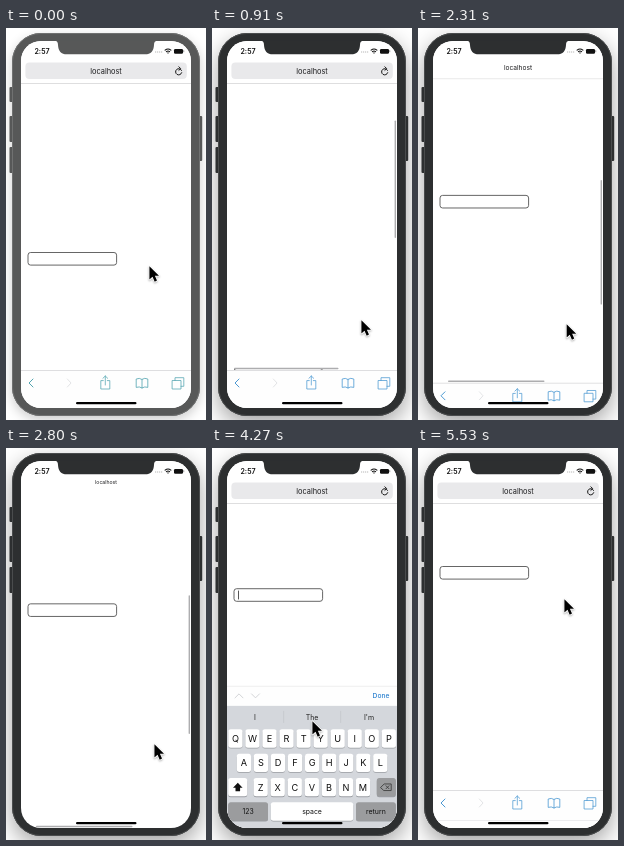
Recreate the animation shown at these times as an HTML page with a canvas. Size 200x392 px, loop 5.6 s.

```html
<!DOCTYPE html>
<html lang="en">
<head>
<meta charset="utf-8">
<title>Phone browser with keyboard</title>
<style>
html, body { margin: 0; width: 100%; height: 100%; overflow: hidden; background: #fff; }
canvas { display: block; width: 200px; height: 392px; }
</style>
</head>
<body>
<canvas id="stage"></canvas>
<script>
const W = 200, H = 392, LOOP = 5600, STEP = 70;
const FONT = 'Inter, Roboto, "Liberation Sans", sans-serif';
const canvas = document.getElementById('stage');
const ctx = canvas.getContext('2d');
const ratio = Math.max(1, window.devicePixelRatio || 1);
canvas.width = W * ratio;
canvas.height = H * ratio;

// Motion tracks: [time, value], eased between neighbours
const fieldTrack = [[280, 224], [880, 340], [910, 340], [1620, 108], [1800, 108], [2600, 192],
  [2870, 148], [3010, 148], [3350, 182], [3920, 182], [4500, 118]];
const collapseTrack = [[950, 0], [1450, 1], [2150, 1], [2412, 0], [2480, 0], [2800, 1], [3900, 1], [4200, 0]];
const keyboardTrack = [[3950, 380], [4383, 209], [5050, 209], [5600, 380]];
const barTrack = [[280, 0], [350, 1], [3010, 1], [3350, 0]];
const tintTrack = [[0, 0], [140, 1]];
const cursorX = [[280, 143], [840, 149], [3010, 148], [3430, 99], [3700, 99], [3850, 97],
  [3960, 97], [4250, 100], [4400, 100], [4900, 157], [5130, 157], [5430, 146]];
const cursorY = [[280, 237], [840, 291], [910, 291], [2240, 295], [3010, 295], [3430, 198], [3700, 198],
  [3850, 187], [3960, 187], [4250, 272], [4400, 272], [4900, 215], [5130, 215], [5430, 150]];

function at(track, t) {
  if (t <= track[0][0]) return track[0][1];
  for (let i = 1; i < track.length; i++) {
    const [t0, a] = track[i - 1], [t1, b] = track[i];
    if (t < t1) {
      const k = (t - t0) / (t1 - t0);
      return a + (b - a) * k * k * (3 - 2 * k);
    }
  }
  return track[track.length - 1][1];
}

function rect(x, y, w, h, color) {
  ctx.fillStyle = color;
  ctx.fillRect(x, y, w, h);
}

function round(x, y, w, h, r, color) {
  ctx.beginPath();
  ctx.roundRect(x, y, w, h, r);
  ctx.fillStyle = color;
  ctx.fill();
}

function text(s, x, y, size, color, weight = 400) {
  ctx.font = `${weight} ${size}px ${FONT}`;
  ctx.fillStyle = color;
  ctx.textAlign = 'center';
  ctx.textBaseline = 'alphabetic';
  ctx.fillText(s, x, y + size * 0.36);
}

function stroke(d, x, y, color, width = 0.8) {
  ctx.save();
  ctx.translate(x, y);
  ctx.strokeStyle = color;
  ctx.lineWidth = width;
  ctx.lineCap = ctx.lineJoin = 'round';
  ctx.stroke(new Path2D(d));
  ctx.restore();
}

function fillPath(d, x, y, color) {
  ctx.save();
  ctx.translate(x, y);
  ctx.fillStyle = color;
  ctx.fill(new Path2D(d));
  ctx.restore();
}

function drawBody(active) {
  const shell = active ? '#2d2f30' : '#575858';
  ctx.save();
  ctx.shadowColor = active ? 'rgba(0,0,0,.36)' : 'rgba(0,0,0,.2)';
  ctx.shadowBlur = (active ? 22 : 12) * ratio;
  ctx.shadowOffsetY = (active ? 8 : 4) * ratio;
  round(6, 5, 188, 383, 29, shell);
  ctx.restore();
  for (const [y, h] of [[59, 15], [88, 26], [119, 26]]) round(3.5, y, 3.5, h, 1, shell);
  round(193, 88, 3.2, 45, 1, shell);
  ctx.beginPath();
  ctx.roundRect(6.5, 5.5, 187, 382, 28.5);
  ctx.strokeStyle = active ? '#4a4c4d' : '#707171';
  ctx.lineWidth = 1;
  ctx.stroke();
}

function drawNotch(active) {
  fillPath('M48 12.5C51 13 52 14 52 17C52.3 23 55 26.3 61 26.3H139C145 26.3 147.7 23 148 17C148 14 149 13 152 12.5Z',
    0, 0, active ? '#2d2f30' : '#575858');
}

function drawStatus() {
  text('2:57', 36, 23.2, 7.1, '#111', 600);
  for (let i = 0; i < 4; i++) rect(149 + i * 2, 23.4, 1.2, 1.2, '#c4c4c4');
  stroke('M-2.9 -1.2Q0 -3.6 2.9 -1.2M-1.6 .3Q0 -1.1 1.6 .3', 162, 23.4, '#111', 1.1);
  round(161.3, 24.2, 1.4, 1.4, 0.7, '#111');
  round(168, 20.9, 9, 4.8, 1.3, '#111');
  rect(177.4, 22.4, 0.8, 1.8, '#777');
}

function drawAddress(p) {
  const line = 55.5 - 13.5 * p;
  rect(15, 13, 170, line - 13, '#fff');
  ctx.globalAlpha = Math.max(0, 1 - 3.2 * p);
  round(19.4, 34.5, 161.4, 16.6, 4, '#e9e9eb');
  stroke('M2.8 -1.2A3.1 3.1 0 1 0 3 1.1M.2 -4.8L2 -3L.2 -1.3', 172.7, 43.6, '#111', 1);
  ctx.globalAlpha = 1 - p;
  rect(15, line - 0.5, 170, 0.7, '#d0d0d2');
  ctx.globalAlpha = 1;
  text('localhost', 100, 43 - 9 * p, 7.4 - 2.3 * p, '#1c1c1e');
  return line;
}

function drawToolbar(top, tint) {
  const mix = (a, b) => Math.round(a + (b - a) * tint);
  const blue = `rgb(${mix(82, 75)},${mix(164, 152)},${mix(176, 210)})`;
  const y = top + 13;
  rect(15, top, 170, 382 - top, '#fefefe');
  rect(15, top, 170, 0.7, '#d2d2d4');
  stroke('M2 -4L-2 0L2 4', 25, y, blue, 1);
  stroke('M-1.6 -4L2 0L-1.6 4', 63, y, '#dcdee0', 0.8);
  stroke('M-2 -2.4H-4.5V6H4.5V-2.4H2M0 2V-7M-2.4 -4.7L0 -7L2.4 -4.7', 99.3, y, blue, 0.75);
  stroke('M0 -3.6Q-2.6 -5.5 -5.8 -4V4.4Q-2.6 3.2 0 5Q2.6 3.2 5.8 4.4V-4Q2.6 -5.5 0 -3.6V5', 136, y, blue);
  stroke('M-5.5 -2.5H3V6H-5.5ZM-3 -2.5V-5.3H5.8V3.3H3', 172, y, blue, 0.75);
}

function drawField(y, focused) {
  ctx.beginPath();
  ctx.roundRect(22, y + 0.5, 88.6, 12.6, 2.6);
  ctx.fillStyle = '#fff';
  ctx.fill();
  ctx.strokeStyle = '#555';
  ctx.lineWidth = 0.9;
  ctx.stroke();
  if (focused) rect(26, y + 2.4, 0.9, 8.8, '#444');
}

function drawScrollbars(field, p, top, bottom, alpha) {
  ctx.globalAlpha = alpha;
  const y = top + 37 + (340 - field) * 0.37;
  round(182.6, y, 1.4, (bottom - top) * 0.41, 0.7, '#adadaf');
  const x = 22 + Math.min(8, 24 * p);
  round(x, bottom - 2.2, 126.5 - x, 1.4, 0.7, '#adadaf');
  ctx.globalAlpha = 1;
}

function key(x, y, w, label, size, color = '#fff') {
  round(x, y + 0.9, w, 18.3, 2.5, '#9a9da2');
  round(x, y, w, 18.3, 2.5, color);
  if (label) text(label, x + w / 2, y + 9.3, size, '#111');
}

function drawKeyboard(top) {
  ctx.save();
  ctx.translate(0, top);
  const gray = '#9b9c9e';
  rect(15, 0, 170, 20, '#fefefe');
  rect(15, 0, 170, 0.6, '#e2e2e4');
  stroke('M-4 2L0 -2L4 2', 27, 10, '#cfd0d3', 0.9);
  stroke('M-4 -2L0 2L4 -2', 43.5, 10, '#cfd0d3', 0.9);
  text('Done', 169, 10, 6.7, '#2b80cf', 500);
  rect(15, 20, 170, 180, '#d4d7dc');
  [['I', 43], ['The', 100], ["I'm", 157]].forEach(([s, x]) => text(s, x, 31.3, 7, '#222'));
  for (const x of [71.5, 128.5]) rect(x, 25, 0.6, 12, '#bec1c6');
  const rows = [['QWERTYUIOP', 23.4, 43.5], ['ASDFGHJKL', 31.9, 67.8], ['ZXCVBNM', 48.7, 92.2]];
  for (const [letters, x, y] of rows) {
    [...letters].forEach((c, i) => key(x + i * 17.05 - 7.1, y, 14.2, c, 9.2));
  }
  key(16.2, 92.2, 19, '');
  fillPath('M0 -4.5L4.8 .4H2.3V4H-2.3V.4H-4.8Z', 25.8, 101.5, '#111');
  key(164.8, 92.2, 19, '', 0, gray);
  stroke('M-5.4 0L-2 -3.3H5V3.3H-2ZM-.2 -1.5L2.8 1.5M2.8 -1.5L-.2 1.5', 174.2, 101.4, '#333', 0.8);
  key(16.2, 116.5, 39.8, '123', 6.9, gray);
  key(58.8, 116.5, 82.4, 'space', 6.9);
  key(144, 116.5, 39.8, 'return', 6.9, gray);
  stroke('M6 0A6 6 0 1 1 -6 0A6 6 0 1 1 6 0M-3.4 1.3Q0 6 3.4 1.3ZM-2 -2.4V-1.4M2 -2.4V-1.4', 33, 153, '#606469', 0.9);
  stroke('M-1.8 -4A1.8 1.8 0 0 1 1.8 -4V0A1.8 1.8 0 0 1 -1.8 0ZM-3.6 -1V0A3.6 3.6 0 0 0 3.6 0V-1M0 3.6V5.8M-1.8 5.8H1.8',
    170, 153, '#777a80', 0.75);
  ctx.restore();
}

function drawCursor(x, y) {
  const arrow = 'M0 0V13.4L3.1 10.5L5.3 15.5L7.6 14.4L5.5 9.6H9.6Z';
  x += 0.4;
  y += 1.2;
  ctx.save();
  ctx.shadowColor = 'rgba(0,0,0,.3)';
  ctx.shadowBlur = 2 * ratio;
  ctx.shadowOffsetY = ratio;
  stroke(arrow, x, y, '#fff', 1.5);
  ctx.restore();
  fillPath(arrow, x, y, '#000');
}

function draw(t) {
  const active = t >= 280;
  const p = at(collapseTrack, t);
  const field = at(fieldTrack, t);
  const keys = at(keyboardTrack, t);
  const bottom = 342 + 38 * p;

  ctx.setTransform(ratio, 0, 0, ratio, 0, 0);
  rect(0, 0, W, H, '#fff');
  drawBody(active);

  ctx.save();
  ctx.beginPath();
  ctx.roundRect(15, 13, 170, 367, 20);
  ctx.clip();
  rect(15, 13, 170, 367, '#fff');
  drawField(field, t >= 3950 && t < 5180);
  const top = drawAddress(p);
  drawToolbar(bottom, at(tintTrack, t));
  drawScrollbars(field, p, top, bottom, at(barTrack, t));
  drawStatus();
  if (keys < 380) drawKeyboard(keys);
  round(70, 374, 60.5, 2.3, 1.15, '#000');
  ctx.restore();

  drawNotch(active);
  drawCursor(at(cursorX, t), at(cursorY, t));
}

function tick() {
  const t = performance.now() % LOOP;
  draw(Math.floor(t / STEP) * STEP);
  requestAnimationFrame(tick);
}
tick();
</script>
</body>
</html>
```
